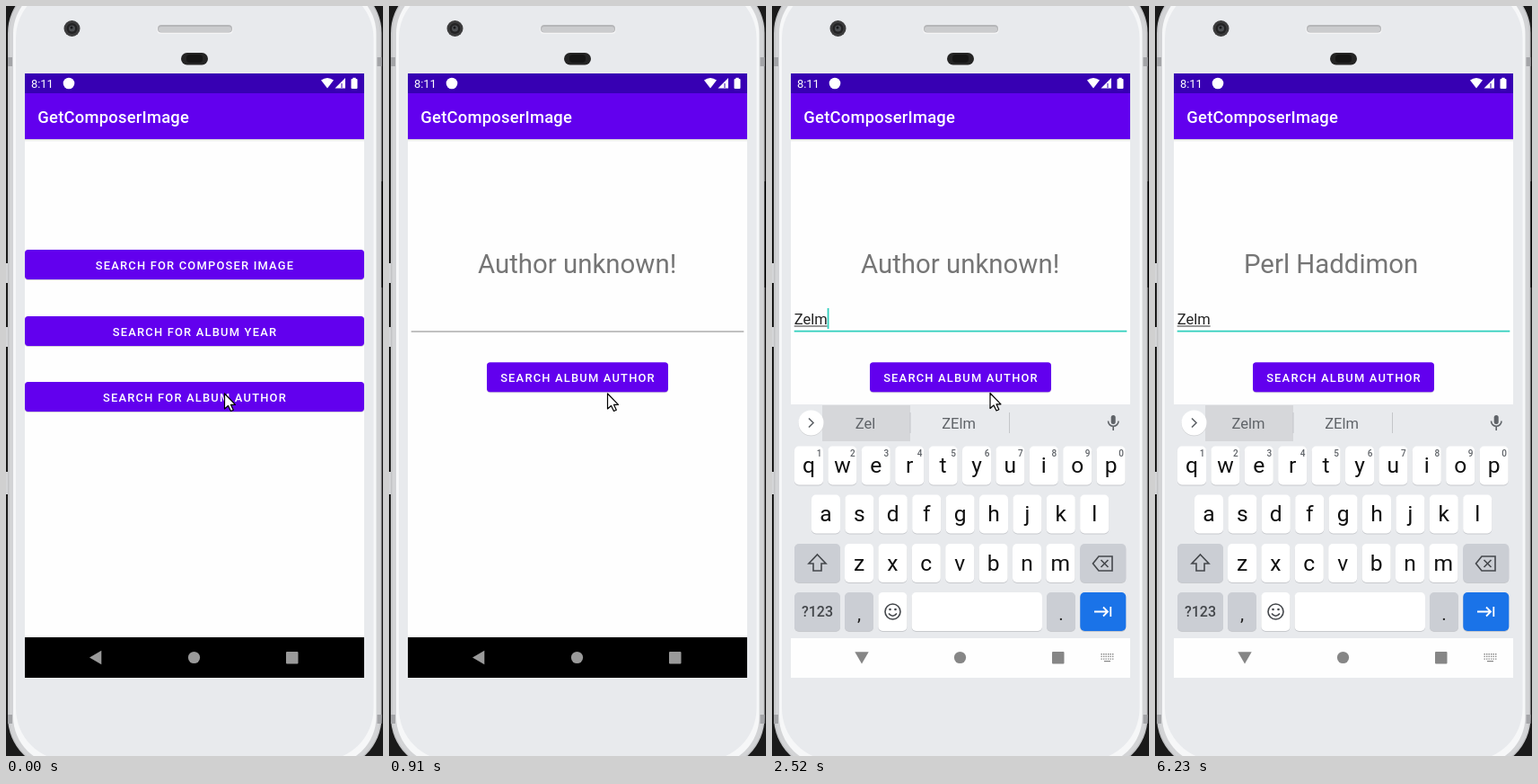
An HTML page with a canvas for the animation above (6.3 s loop, 420 px wide and 834 px high).

```html
<!DOCTYPE html>
<html lang="en">
<head>
<meta charset="utf-8">
<style>
html, body { margin: 0; width: 100%; height: 100%; overflow: hidden; background: #111; }
canvas { display: block; width: 420px; height: 834px; }
</style>
</head>
<body>
<canvas id="stage"></canvas>
<script>
const W = 420, H = 834, LOOP = 6300, STEP = 70;
const PURPLE = '#6200ee', TEAL = '#2fcfbd', GREY = '#5f6368';
const SCREEN = { x: 21, y: 75, w: 378, h: 672, cx: 210, cy: 411 };
const TITLE = 'Zelm', AUTHOR = 'Perl Haddimon';

const dpr = window.devicePixelRatio || 1;
function setup(canvas) {
  canvas.width = W * dpr;
  canvas.height = H * dpr;
  const c = canvas.getContext('2d');
  c.scale(dpr, dpr);
  return c;
}
const main = setup(document.getElementById('stage'));
const layer = setup(document.createElement('canvas'));
let g = main;

const clamp = v => Math.min(1, Math.max(0, v));
const mix = (a, b, p) => a + (b - a) * p;

// y at a given x of a cubic Bezier with points [x0,y0,...,x3,y3]
function curve(pts, x) {
  const at = (s, k) => {
    const u = 1 - s;
    return u * u * u * pts[k] + 3 * u * u * s * pts[k + 2] + 3 * u * s * s * pts[k + 4] + s * s * s * pts[k + 6];
  };
  let lo = 0, hi = 1;
  for (let i = 0; i < 24; i++) {
    const m = (lo + hi) / 2;
    if (at(m, 0) < x) lo = m; else hi = m;
  }
  return at(lo, 1);
}
const fastOutSlowIn = x => curve([0, 0, 0.4, 0, 0.2, 1, 1, 1], clamp(x));
const extraSlowIn = x => x < 1 / 6
  ? curve([0, 0, 0.05, 0, 0.1333, 0.06, 0.1667, 0.4], clamp(x))
  : curve([0.1667, 0.4, 0.2083, 0.82, 0.25, 1, 1, 1], clamp(x));

function rect(x, y, w, h, color, r = 0) {
  g.fillStyle = color;
  g.beginPath();
  g.roundRect(x, y, w, h, r);
  g.fill();
}
function disc(x, y, r, color) {
  g.fillStyle = color;
  g.beginPath();
  g.arc(x, y, r, 0, 7);
  g.fill();
}
function poly(pts, fill) {
  g.beginPath();
  pts.forEach(([x, y], i) => i ? g.lineTo(x, y) : g.moveTo(x, y));
  g.closePath();
  g.fillStyle = fill;
  g.fill();
}
function line(path, color, width = 1.6) {
  g.strokeStyle = color;
  g.lineWidth = width;
  g.stroke(new Path2D(path));
}
function text(str, x, y, size, color, { weight = 400, align = 'left', spacing = 0 } = {}) {
  g.font = `${weight} ${size}px Roboto, sans-serif`;
  g.letterSpacing = spacing + 'px';
  g.textAlign = align;
  g.fillStyle = color;
  g.fillText(str, x, y);
  const width = g.measureText(str).width;
  g.letterSpacing = '0px';
  return width;
}
function at(x, y, draw, scale = 1, angle = 0) {
  g.save();
  g.translate(x, y);
  g.rotate(angle);
  g.scale(scale, scale);
  draw();
  g.restore();
}
const scaled = (s, draw) => at(SCREEN.cx, SCREEN.cy, () => {
  g.translate(-SCREEN.cx, -SCREEN.cy);
  draw();
}, s);

// Draws a group flattened at one opacity.
function faded(alpha, draw) {
  if (alpha >= 1) return draw();
  layer.clearRect(0, 0, W, H);
  g = layer;
  draw();
  g = main;
  g.save();
  g.globalAlpha = alpha;
  g.drawImage(layer.canvas, 0, 0, W, H);
  g.restore();
}

function drawPhone() {
  rect(0, 0, W, H, '#1a1a1a');
  for (const [y, h] of [[286, 22], [357, 22], [518, 25]]) rect(0, y, 2, h, '#d4d5d7');
  rect(2, -28, 416.5, 877, '#c3c4c6', 58);
  rect(3.5, -27, 413.5, 875, '#d3d4d6', 57);
  rect(8, -23, 404.5, 867, '#f6f7f8', 54);
  rect(11, -22, 398.5, 861, '#e8eaed', 58);
  for (const y of [57, 788]) {
    rect(2, y, 5, 10, '#a4a5a8');
    rect(413.5, y, 5, 10, '#a4a5a8');
  }
  rect(418.5, 195, 1.5, 118, '#000');
  disc(73.5, 25, 9, '#3c3c3d');
  disc(73.5, 25, 6, '#232324');
  disc(73.5, 25, 3.5, '#4d4f52');
  disc(73, 24, 1.5, '#17181a');
  rect(168.5, 21, 84, 10, '#f5f5f6', 4);
  rect(169, 21, 83, 8.5, '#b5b6b8', 4);
  rect(170, 23, 81, 6, '#cbccce', 3);
  rect(195, 52, 30, 13.5, '#242424', 6.7);
  rect(201, 54, 18, 9, '#151515', 4);
}

function drawWindow() {
  rect(21, 75, 378, 672, '#fefefe');
  rect(21, 148, 378, 1, '#d6d6d6');
  rect(21, 149, 378, 1.5, '#f1f1f1');
  rect(21, 75, 378, 22, '#3700b3');
  rect(21, 97, 378, 51, PURPLE);
  rect(21, 702, 378, 45, '#000');
  text('GetComposerImage', 35.3, 130, 18.4, '#fff', { weight: 500, spacing: 0.23 });
}

function drawButton(label, x, y, w, rippleAge = -1) {
  const h = 33;
  rect(x, y + 1, w, h, '#d3d0d9', 4);
  rect(x, y, w, h, PURPLE, 3.7);
  if (rippleAge >= 0) {
    g.save();
    g.beginPath();
    g.roundRect(x, y, w, h, 3.7);
    g.clip();
    const fade = 0.2 * clamp((380 - rippleAge) / 110);
    disc(x + w / 2 + 8, y + 20, w * mix(0.1, 0.62, clamp(rippleAge / 230)), `rgba(255,255,255,${fade})`);
    g.restore();
  }
  text(label, x + w / 2 + 0.5, y + 21.5, 12.9, '#fff', { weight: 500, align: 'center', spacing: 1.2 });
}

function drawMenu(t) {
  drawWindow();
  drawButton('SEARCH FOR COMPOSER IMAGE', 21, 271, 378);
  drawButton('SEARCH FOR ALBUM YEAR', 21, 345, 378);
  drawButton('SEARCH FOR ALBUM AUTHOR', 21, 418, 378, t - 320);
}

function typedLength(t) {
  return [1750, 1820, 2030, 2240].filter(time => t >= time).length;
}
function caretOn(t) {
  if (t < 1470) return false;
  return ![[3080, 3570], [4130, 4620], [5180, 5740], [6230, LOOP]].some(([a, b]) => t >= a && t < b);
}

function drawSearch(t) {
  drawWindow();
  text(t < 4620 ? 'Author unknown!' : AUTHOR, 99, 297, 29.4, '#757575');
  const typed = TITLE.slice(0, typedLength(t));
  const width = text(typed, 24.7, 354, 16.5, '#222');
  if (typed) {
    const marked = t >= 2240 && t < 2520 ? g.measureText(TITLE.slice(0, 3)).width : width;
    rect(24.7, 355.5, marked, 1, '#333');
  }
  if (t < 1470) rect(24.7, 361.5, 370.6, 1, '#858585');
  else rect(24.7, 360.8, 370.6, 1.8, TEAL);
  if (caretOn(t)) rect(24.7 + width, 336, 1.8, 23, TEAL);
  drawButton('SEARCH ALBUM AUTHOR', 109, 396.3, 202, t - 3400);
}

function drawStatus() {
  text('8:11', 28, 91, 12.9, '#fff');
  disc(70, 86, 6.3, '#fff');
  g.fillStyle = '#fff';
  g.fill(new Path2D('M351 82.5 Q358 77.5 365 82.5 L358 91.5 Z'));
  poly([[366.5, 91.5], [378, 91.5], [378, 80]], '#fff');
  line('M374 86 L374 91', '#3700b3', 1);
  rect(384.5, 81, 7, 11, '#fff', 1);
  rect(386.3, 79.8, 3.4, 2, '#fff');
}

function drawNav(t) {
  const p = clamp((t - 1890) / 210);
  const v = Math.round(mix(154, 134, p));
  const color = `rgb(${v},${v},${v})`;
  at(100, 724.5, () => poly([[-7, 0], [6.3, -7.7], [6.3, 7.7]], color), 1, -p * Math.PI / 2);
  disc(209.5, 724.5, 6.6, color);
  rect(312, 718, 13.5, 13.5, color, 1);
  if (t < 1820) return;
  for (let row = 0; row < 3; row++)
    for (let col = 0; col < 6; col++) rect(366.5 + col * 2.5, 720 + row * 2.7, 1.4, 1.4, color);
  rect(370, 728, 7, 1.2, color);
}

function drawMic() {
  rect(377.7, 455, 5, 10, GREY, 2.5);
  line('M374.5 461.5 A5.7 5.7 0 0 0 386 461.5 M380.2 467.5 V472', GREY);
}

function drawToolbar() {
  disc(43.5, 463.5, 14, '#fff');
  line('M46 458.5 L41 463.5 L46 468.5', GREY);
  line('M97 461 A4.8 4.8 0 1 1 87.4 461 A4.8 4.8 0 1 1 97 461 M96 465 L102 471', GREY, 1.8);
  line('M142 456 H156 V466 L151 470 H142 Z M146 460 V462 M152 460 V462 M145 465 Q149 468 153 465', GREY);
  text('GIF', 203, 468, 13, GREY, { weight: 900, align: 'center' });
  line('M252 457 H265 V471 H252 Z M256 456.5 H261 M255 461 H262 M255 464 H262 M255 467 H260', GREY);
  for (const x of [320, 325.5, 331]) disc(x, 463.5, 1.8, GREY);
}

function drawSuggestions(t) {
  rect(56, 444, 98, 40, '#d6d7da');
  disc(43.5, 464.3, 14, '#cdced1');
  disc(43.5, 463.5, 14, '#fff');
  line('M41 458.5 L46 463.5 L41 468.5', GREY);
  const style = { align: 'center' };
  text(t < 2660 ? TITLE.slice(0, 3) : TITLE, 104, 470, 16.5, GREY, style);
  text(TITLE.slice(0, 2).toUpperCase() + TITLE.slice(2), 208, 470, 16.5, GREY, style);
  for (const x of [153.5, 264]) rect(x, 452, 1, 23, '#c4c6c9');
}

function drawKey(x, y, w, color = '#fff') {
  rect(x, y + 1, w, 43, '#c7c9cd', 5);
  rect(x, y, w, 43, color, 5);
}
function drawLetters(letters, x, y, digits) {
  [...letters].forEach((ch, i) => {
    const kx = x + i * 37.4;
    drawKey(kx, y, 32);
    text(ch, kx + 16, y + 29.5, 24.6, '#101010', { align: 'center' });
    if (digits) text((i + 1) % 10, kx + 27.5, y + 11.5, 10, GREY, { align: 'center', weight: 500 });
  });
}

function drawKeyboard(t) {
  const special = '#cbced4', ink = '#44474b';
  rect(21, 443, 378, 260, '#e8eaed');
  rect(21, 703, 378, 44, '#fefefe');
  if (t < 2100) drawToolbar(); else drawSuggestions(t);
  drawMic();
  drawLetters('qwertyuiop', 25, 489.5, true);
  drawLetters('asdfghjkl', 44, 543.5);
  drawLetters('zxcvbnm', 81, 598);
  drawKey(25, 598, 51, special);
  line('M50.5 610 L60 620 H55 V628 H46 V620 H41 Z', ink);
  drawKey(343.3, 598, 51, special);
  line('M364 612 H379 V628 H364 L357.5 620 Z M366.5 616 L374.5 624 M374.5 616 L366.5 624', ink);
  drawKey(25, 652, 51, special);
  text('?123', 50.5, 679, 16, ink, { align: 'center', weight: 500 });
  drawKey(81, 652, 32, special);
  text(',', 97, 683, 21, '#222', { align: 'center' });
  drawKey(118.4, 652, 32);
  line('M143 673.5 A8.5 8.5 0 1 1 126 673.5 A8.5 8.5 0 1 1 143 673.5 M130 675.5 Q134.5 681 139 675.5', ink);
  disc(131.5, 671, 1.3, ink);
  disc(137.5, 671, 1.3, ink);
  drawKey(155.6, 652, 145.4);
  drawKey(306, 652, 32, special);
  text('.', 322, 683, 21, '#222', { align: 'center' });
  drawKey(343.3, 652, 51, '#1a73e8');
  line('M359 673.5 H374 M369 668.5 L374 673.5 L369 678.5 M377.3 668 V679', '#fff', 1.8);
}

// [start time, x, y] of the pointer tip; it leaves at 5600.
const POINTER = [
  [0, 243.5, 431], [2520, 243, 430.5], [2590, 239, 428], [2660, 232, 425], [2730, 226, 422],
  [2940, 219.5, 415.5], [4410, 221.5, 419.5], [5390, 211.5, 330], [5460, 216, 180], [5530, 236, 54]
];
function drawPointer(t) {
  if (t >= 5600) return;
  const [, x, y] = POINTER.findLast(p => t >= p[0]);
  at(x, y, () => {
    poly([[0, 0], [0, 17], [4, 13.5], [7, 19.5], [9.8, 18.3], [7, 12.3], [12, 12.3]], '#fff');
    g.lineJoin = 'round';
    g.strokeStyle = '#000';
    g.lineWidth = 1.2;
    g.stroke();
  });
}

function drawScreen(t) {
  g.save();
  g.beginPath();
  g.rect(SCREEN.x, SCREEN.y, SCREEN.w, SCREEN.h);
  g.clip();
  const open = (t - 500) / 400;
  const p = open > 0 ? extraSlowIn(open) : 0;
  if (open < 1) scaled(mix(1, 1.05, p), () => drawMenu(t));
  if (open > 0) {
    if (open < 1) rect(21, 75, 378, 672, `rgba(0,0,0,${0.12 * p})`);
    faded(clamp((t - 530) / 50), () => scaled(mix(0.85, 1, p), () => drawSearch(t)));
  }
  const rise = fastOutSlowIn((t - 1815) / 285);
  if (rise > 0) faded(Math.pow(rise, 1.25), () => at(0, 304 * (1 - rise), () => drawKeyboard(t)));
  drawStatus();
  drawNav(t);
  g.restore();
}

function render(now) {
  const t = Math.floor((now % LOOP) / STEP) * STEP;
  drawPhone();
  drawScreen(t);
  drawPointer(t);
}

const start = performance.now();
function loop() {
  render(performance.now() - start);
  requestAnimationFrame(loop);
}
loop();
</script>
</body>
</html>
```
